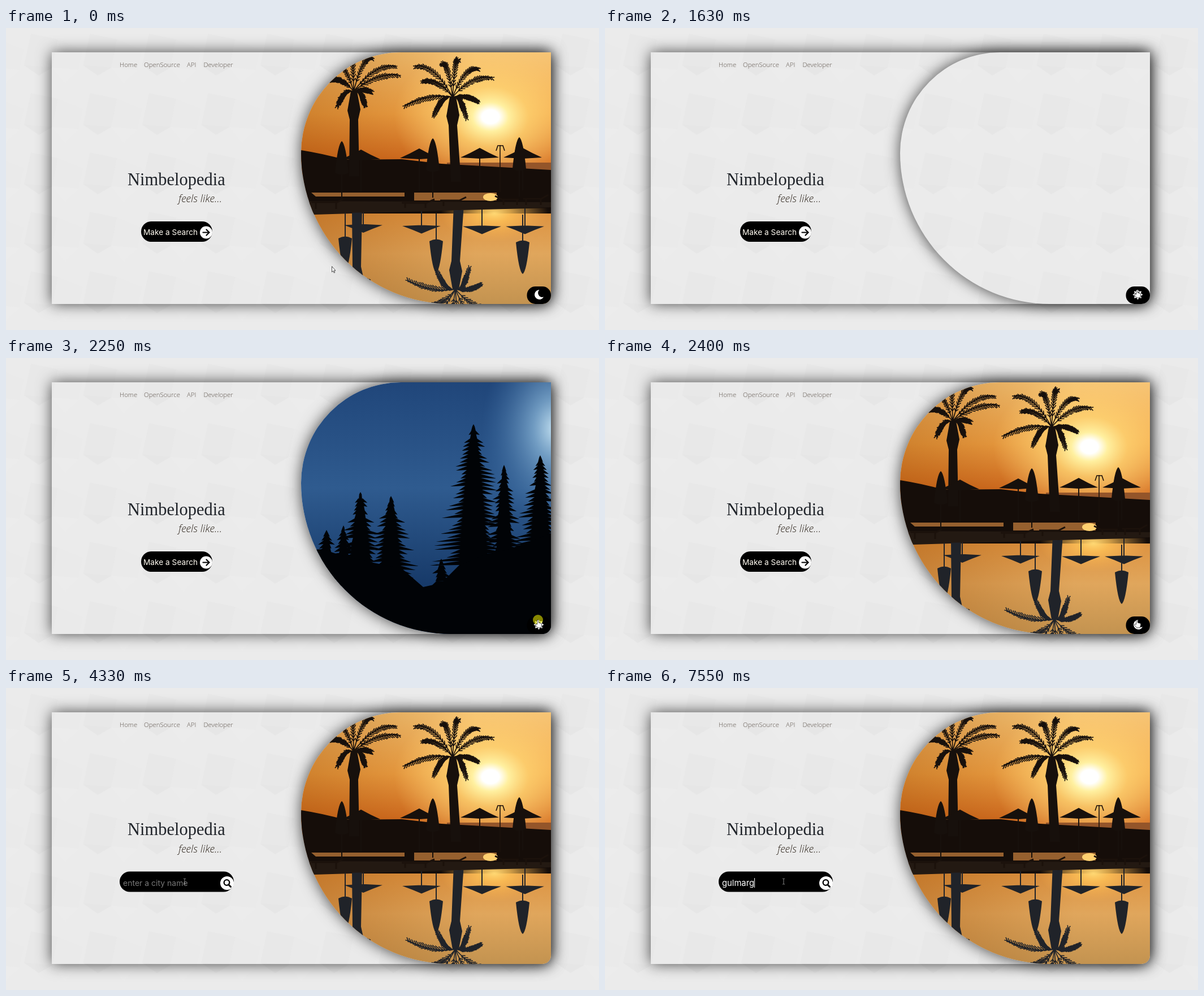
An HTML page that plays this animation: 1049 by 534 pixels, repeating every 8 s.

```html
<!DOCTYPE html>
<html lang="en">
<head>
<meta charset="utf-8">
<title>Nimbelopedia</title>
<style>
  html, body { margin: 0; width: 100%; height: 100%; overflow: hidden; background: #ebebeb; }
  .layer { position: absolute; left: 0; top: 0; width: 1049px; height: 534px; }
  .panel, .photo { position: absolute; top: 43px; height: 445px; box-shadow: 0 0 27px rgba(0,0,0,.7); }
  .panel { left: 81px; width: 883px; border-radius: 0 0 15px 0; }
  .photo { left: 522px; width: 442px; border-radius: 40% 0 15px 60%; overflow: hidden; }
  .photo svg { display: block; width: 100%; height: 100%; }
  .menu { font: 300 11.4px "Open Sans", sans-serif; fill: #5c524a; }
  .title { font: 30.5px "Liberation Serif", serif; fill: #20242a; }
  .tagline { font: italic 300 18.6px "Open Sans", sans-serif; fill: #2a2118; }
  .label { font: 13.7px Inter, sans-serif; fill: #fffaf0; }
  .hint { font: 14px Inter, sans-serif; fill: #777; }
  .value { font: 14.8px Inter, sans-serif; fill: #fff; }
</style>
</head>
<body>
<svg class="layer">
  <defs>
    <pattern id="gems" width="104.5" height="105" patternUnits="userSpaceOnUse" x="32" y="8">
      <path d="M12 2 60 12 50 62 26 76 0 58Z" fill="#e8e8e8"/>
      <path d="M0 58 50 62 26 76Z" fill="#e6e6e6"/>
      <path d="M60 12 104 30 96 66 50 62Z" fill="#eaeaea"/>
      <path d="M50 62 96 66 72 90Z" fill="#ececec"/>
    </pattern>
  </defs>
  <rect width="1049" height="534" fill="url(#gems)"/>
</svg>

<div class="panel"></div>

<div class="photo">
<svg viewBox="522 43 442 445">
  <defs>
    <linearGradient id="sky" x2="0" y2="1">
      <stop stop-color="#f6c576"/><stop offset=".5" stop-color="#f2a548"/><stop offset=".9" stop-color="#d2691f"/>
    </linearGradient>
    <linearGradient id="water" x2="0" y2="1">
      <stop stop-color="#dc8e3a"/><stop offset=".5" stop-color="#e0a65c"/><stop offset="1" stop-color="#c39350"/>
    </linearGradient>
    <linearGradient id="dim">
      <stop stop-color="#964600" stop-opacity=".38"/><stop offset=".7" stop-color="#964600" stop-opacity="0"/>
    </linearGradient>
    <radialGradient id="sun">
      <stop offset=".09" stop-color="#fff"/><stop offset=".19" stop-color="#fff0a0"/>
      <stop offset=".4" stop-color="#ffd674" stop-opacity=".75"/><stop offset="1" stop-color="#ffd074" stop-opacity="0"/>
    </radialGradient>
    <radialGradient id="glint">
      <stop stop-color="#ffd873"/><stop offset=".3" stop-color="#ffc257" stop-opacity=".8"/>
      <stop offset="1" stop-color="#f8b050" stop-opacity="0"/>
    </radialGradient>
    <linearGradient id="dusk" x2="0" y2="1">
      <stop stop-color="#20467a"/><stop offset=".42" stop-color="#2f5b8f"/><stop offset=".8" stop-color="#173a69"/>
    </linearGradient>
    <radialGradient id="moonlight">
      <stop stop-color="#c5e2f2"/><stop offset=".3" stop-color="#88b4d6" stop-opacity=".75"/>
      <stop offset="1" stop-color="#3f71a8" stop-opacity="0"/>
    </radialGradient>
    <path id="open" d="M-34 17Q-16 9 0 0Q16 9 34 17L0 19ZM-1 10H1V75H-1Z"/>
    <path id="closed" d="M0 0Q7 5 12 56Q0 63-12 56Q-7 5 0 0M-1 55H1V105H-1Z"/>
    <g id="palms"></g>
    <g id="parasols">
      <use href="#open" x="628" y="215"/><use href="#open" x="731" y="213"/>
      <use href="#open" x="838" y="212"/><use href="#open" x="914" y="212"/>
    </g>
    <g id="folded">
      <use href="#closed" x="594" y="200"/><use href="#closed" x="755" y="195"/><use href="#closed" x="908" y="193"/>
    </g>
  </defs>
  <g id="day">
    <path d="M522 43H964V260H522Z" fill="url(#sky)"/>
    <path d="M522 310H964V488H522Z" fill="url(#water)"/>
    <path d="M522 43H964V488H522Z" fill="url(#dim)"/>
    <ellipse cx="857" cy="157" rx="170" ry="135" fill="url(#sun)"/>
    <path d="M780 238H964V252H780Z" fill="#94552a"/>
    <path d="M522 216Q560 222 600 233L700 232 770 240 964 251V328H522Z" fill="#150d09"/>
    <path d="M540 291H705V298H548ZM722 291H868V305H722Z" fill="#96602f"/>
    <ellipse cx="857" cy="299" rx="13" ry="7" fill="#ffd070"/>
    <path d="M522 306 964 308V317L545 330H522Z" fill="#231912"/>
    <g fill="none" stroke="#1b110b" stroke-width="3">
      <path d="M540 308h46l10-5M548 308v12M584 308v12M700 309h44l14-6M706 309v9M742 309v9M768 305h34l12-6M774 305v10M865 297l12 6h30M915 302h32l12-7M880 303v10M904 303v10M920 302v11M946 302v11"/>
      <path d="M874 207V290M867 217l3-9h9l3 9" stroke-width="1.6"/>
    </g>
    <g color="#17100c" fill="currentColor" stroke="currentColor" stroke-width="0">
      <use href="#palms"/><use href="#parasols"/><use href="#folded"/>
    </g>
    <clipPath id="pool"><path d="M522 329 964 318V488H522Z"/></clipPath>
    <g clip-path="url(#pool)" color="#202329" fill="currentColor" stroke="currentColor" stroke-width="0">
      <ellipse cx="864" cy="328" rx="95" ry="50" fill="url(#glint)"/>
      <use href="#palms" transform="translate(5 584) scale(1 -1)"/>
      <use href="#parasols" transform="translate(4 534) scale(1 -.8)"/>
      <use href="#folded" transform="translate(6 628) scale(1 -1)"/>
    </g>
  </g>
  <g id="night">
    <path d="M522 43H964V488H522Z" fill="url(#dusk)"/>
    <ellipse cx="972" cy="125" rx="130" ry="180" fill="url(#moonlight)"/>
    <path id="firs" fill="#010306"/>
    <path d="M522 340 560 338 590 348 650 362 700 372 738 405 770 398 800 368 840 350 890 338 964 310V488H522Z" fill="#010306"/>
  </g>
</svg>
</div>

<svg class="layer">
  <g class="menu">
    <text x="201" y="69">Home</text><text x="244" y="69">OpenSource</text>
    <text x="320" y="69">API</text><text x="349.5" y="69">Developer</text>
  </g>
  <g id="heading" text-anchor="middle">
    <text class="title" x="301.5" y="277.5">Nimbelopedia</text>
    <text class="tagline" x="343.5" y="308">feels like...</text>
  </g>
  <g id="button">
    <rect x="239" y="342" width="126" height="36" rx="18"/>
    <text class="label" x="243" y="366">Make a Search</text>
    <circle cx="354" cy="361.5" r="11" fill="#fff"/>
    <path d="M348.5 361.5H359.5M354.5 356.5l5 5-5 5" fill="none" stroke="#000" stroke-width="2.2" stroke-linecap="round"/>
  </g>
  <g id="search">
    <rect x="201" y="324.5" width="202" height="36" rx="18"/>
    <circle cx="391" cy="345" r="12" fill="#fff"/>
    <path d="M393.5 347.5l4 4" stroke="#000" stroke-width="3" stroke-linecap="round"/>
    <circle cx="390.5" cy="344" r="4.8" fill="none" stroke="#000" stroke-width="2.3"/>
    <text id="hint" class="hint" x="207" y="350">enter a city name</text>
    <text id="value" class="value" x="207" y="350"></text>
    <rect id="caret" y="336" width="1" height="17" fill="#fff"/>
  </g>
  <g id="toggle">
    <rect x="921.5" y="457" width="42.5" height="31" rx="15"/>
    <path id="moon" d="M943.5 463A8.5 8.5 0 1 0 951 475.5A7.5 7.5 0 0 1 943.5 463" fill="#fff"/>
    <g id="star"><path fill="#fff"/><circle cx="942.5" cy="471.5" r="4.4" fill="none" stroke="#000"/></g>
  </g>
  <g id="cursor">
    <circle id="press" r="9" fill="#ff0" opacity=".53"/>
    <path id="arrow" d="M.5.5V10.5L2.8 8.5 4.3 12 5.7 11.4 4.3 8H7Z" fill="#fff" stroke="#222" stroke-width=".8"/>
    <path id="hand" d="M-1.3 8V1.3a1.3 1.3 0 0 1 2.6 0V5l4 1q1.5.5 1.5 2l-.6 3-1 3H-.5l-4-5q0-2 2-1.5Z" fill="#fff" stroke="#222" stroke-width=".8"/>
    <path id="beam" d="M-1-5H.5L1-4.5 1.5-5H3M1-4.5V4.5M-1 5H.5L1 4.5 1.5 5H3" fill="none" stroke="#aaa" stroke-width=".8"/>
  </g>
</svg>

<script>
const LOOP = 8000;
const el = id => document.getElementById(id);
const show = (id, on) => el(id).style.display = on ? '' : 'none';
const between = (v, a, b) => v >= a && v < b;

let seed = 7;
const random = () => { const v = Math.sin(++seed * 12.9898) * 43758.5453; return v - Math.floor(v); };

// A drooping rib with short leaflets swept towards the tip.
function frond(x, y, tipX, tipY) {
  const midX = x + (tipX - x) * .5, midY = Math.min(y, tipY) - 6;
  let d = `M${x} ${y}Q${midX} ${midY} ${tipX} ${tipY}`;
  for (let u = .15; u < 1; u += .055) {
    const v = 1 - u;
    const px = v * v * x + 2 * u * v * midX + u * u * tipX;
    const py = v * v * y + 2 * u * v * midY + u * u * tipY;
    const angle = Math.atan2(v * (midY - y) + u * (tipY - midY), v * (midX - x) + u * (tipX - midX));
    const size = 3 + 6 * Math.sin(Math.PI * u) + 3 * random();
    for (const side of [-.5, .5]) {
      d += `M${px} ${py}l${size * Math.cos(angle + side)} ${size * Math.sin(angle + side) + 1.5}`;
    }
  }
  return d;
}

function palm(x, y, lean, tips) {
  const trunk = `M${x - 5} ${y}H${x + 6}L${x + 12} ${y + 32} ${x + 8} ${y + 50} ${x + 9 + lean} ${y + 150}H${x - 9 + lean}L${x - 7} ${y + 50} ${x - 11} ${y + 34}Z`;
  const leaves = tips.map(([tx, ty]) => frond(x, y, tx, ty)).join('');
  return `<path d="${trunk}"/><path d="${leaves}" fill="none" stroke-width="1.6"/>`;
}

el('palms').innerHTML =
  palm(615, 112, 1, [[574, 92], [584, 66], [612, 52], [648, 54], [690, 68], [697, 84], [646, 112], [586, 138], [636, 138]]) +
  palm(790, 122, 6, [[705, 138], [724, 68], [736, 94], [772, 64], [799, 57], [835, 72], [860, 88], [836, 130], [756, 156], [815, 160]]);

// Ragged branches down one side, then mirrored up the other.
function fir(x, top, bottom, half) {
  let left = `M${x} ${top}`, right = '';
  for (let y = top + 4; y < bottom; y += 7) {
    const reach = 2 + half * Math.pow((y - top) / (bottom - top), .7);
    const a = reach * (.4 + .75 * random()), b = reach * (.4 + .75 * random());
    left += `L${x - reach * .35} ${y}L${x - a} ${y + 8}`;
    right = `L${x + b} ${y + 8}L${x + reach * .35} ${y}` + right;
  }
  return left + right + 'Z';
}

el('firs').setAttribute('d', [
  [827, 117, 430, 82], [881, 189, 420, 48], [945, 172, 400, 58], [627, 237, 400, 58],
  [681, 244, 420, 58], [567, 304, 380, 30], [597, 296, 390, 28], [770, 355, 440, 36]
].map(tree => fir(...tree)).join(''));

let star = '';
for (let i = 0; i < 16; i++) {
  const r = i % 2 ? 6 : 9, a = i * Math.PI / 8;
  star += `${i ? 'L' : 'M'}${942.5 + r * Math.sin(a)} ${471.5 - r * Math.cos(a)}`;
}
el('star').firstChild.setAttribute('d', star + 'Z');

// start, end, steps, x, y
const moves = [
  [520, 520, 1, 910, 424], [830, 1210, 6, 941, 463], [2860, 2860, 1, 368, 362],
  [3210, 3280, 2, 359, 361], [4080, 4330, 4, 315, 342]
];
const presses = [[1460, 1540], [2250, 2400], [3450, 3530], [4780, 4930]];
const keyTimes = [6230, 6380, 6610, 6930, 7080, 7230, 7550];

function pointer(t) {
  let x = 576, y = 421;
  for (const [start, end, steps, toX, toY] of moves) {
    if (t < start) break;
    const done = end > start ? 1 + Math.floor((t - start) / (end - start) * (steps - 1) + .01) : 1;
    const k = Math.min(1, done / steps);
    x += (toX - x) * k;
    y += (toY - y) * k;
  }
  return [Math.round(x), Math.round(y)];
}

function render(t) {
  const opened = t >= 3600;
  const dark = between(t, 1630, 2400);
  show('day', !dark);
  show('night', dark && t >= 1710);
  show('moon', !dark);
  show('star', dark);
  show('toggle', !opened);
  show('button', !opened);
  show('search', opened);
  el('heading').setAttribute('transform', `translate(0 ${opened ? -17.5 : 0})`);

  const typed = 'gulmarg'.slice(0, keyTimes.filter(k => t >= k).length);
  el('value').textContent = typed;
  show('hint', !typed);
  show('caret', between(t, 4780, 5590) || t >= 6140);
  el('caret').setAttribute('x', 207 + (typed ? el('value').getComputedTextLength() : 0));

  const [x, y] = pointer(t);
  const onLink = !opened && (x > 922 && y > 457 || between(x, 239, 365) && between(y, 342, 378));
  const onInput = opened && between(x, 201, 379) && between(y, 325, 360);
  el('cursor').setAttribute('transform', `translate(${x} ${y})`);
  show('press', presses.some(([a, b]) => between(t, a, b)));
  show('hand', onLink);
  show('beam', onInput);
  show('arrow', !onLink && !onInput);
}

function tick() {
  render(performance.now() % LOOP);
  requestAnimationFrame(tick);
}
tick();
</script>
</body>
</html>
```
